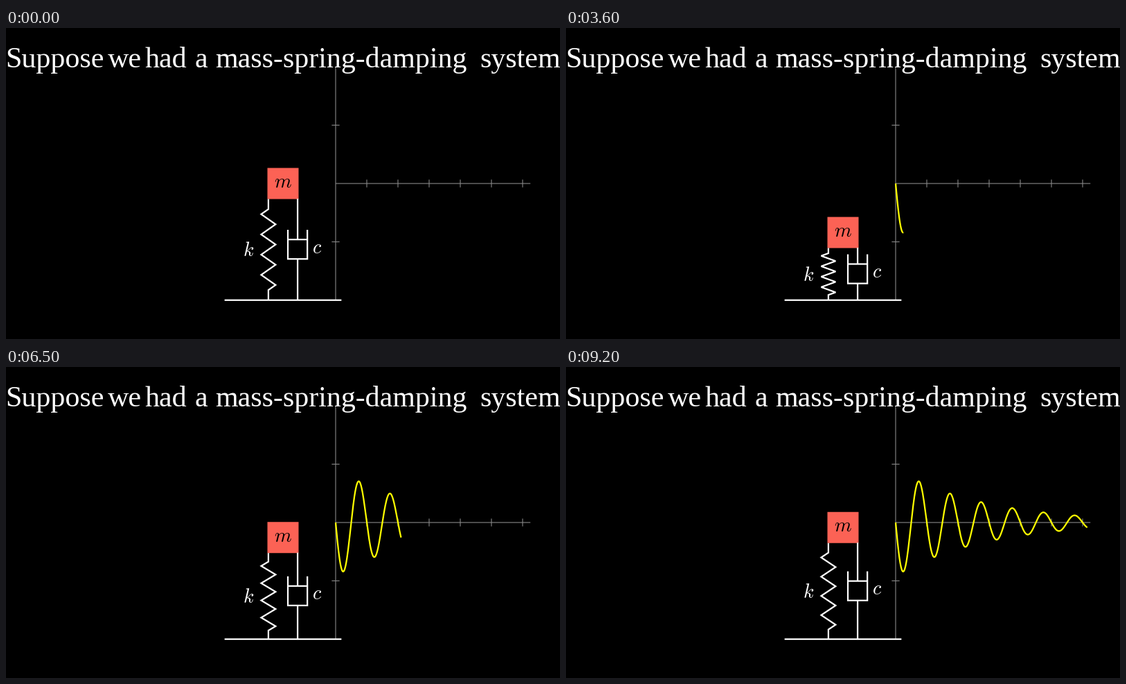
Recreate the animation shown at these times as a matplotlib script. Size 800 by 450 pixels, loop 9300 ms.

```python
import numpy as np
import matplotlib.pyplot as plt
from matplotlib.animation import FuncAnimation
from matplotlib.patches import Polygon, Rectangle

W, H, DPI = 800, 450, 100
FRAMES, STEP = 93, 100
PT = 72 / DPI                    # points per pixel
RED, GREY, YELLOW = "#fc6255", "#888888", "#ffff00"

UNIT = 56.25                     # pixels per scene unit
X0, Y0 = 476, 225                # plot origin
TICK = 0.8 * UNIT                # one second on the time axis
GROUND = Y0 + 3 * UNIT
HALF = 0.4 * UNIT                # half the side of the mass
SPRING_X, DAMPER_X = 400 - 0.375 * UNIT, 400 + 0.375 * UNIT
CUP = 0.25 * UNIT                # half the side of the piston box

plt.rcParams["mathtext.fontset"] = "cm"
plt.rcParams["path.snap"] = False

fig = plt.figure(figsize=(W / DPI, H / DPI), dpi=DPI, facecolor="black")
ax = fig.add_axes([0, 0, 1, 1])
ax.set_xlim(0, W)
ax.set_ylim(H, 0)
ax.axis("off")


def line(xs=(), ys=(), color="white", width=2.25, z=3):
    return ax.plot(xs, ys, color=color, lw=width * PT, zorder=z,
                   solid_capstyle="butt", solid_joinstyle="miter")[0]


def label(x, y, text, color="white", ha="center", size=28, **kw):
    return ax.text(x, y, text, color=color, ha=ha, va="baseline",
                   fontsize=size * PT, zorder=5, **kw)


def smooth(u):
    if u <= 0 or u >= 1:
        return float(u >= 1)
    edge = 1 / (1 + np.exp(5))
    return (1 / (1 + np.exp(-10 * (u - 0.5))) - edge) / (1 - 2 * edge)


def drop(t):
    """Downward displacement of the mass in pixels."""
    return 77.4 * np.exp(-0.35 * t) * np.sin(2 * np.pi * t)


def clock(s):
    """Time on the plot: eased push, hold, then free oscillation."""
    return 0.25 * smooth(s - 2.267) + 1.5 * max(s - 5.267, 0)


# Heading
for x, word in ((-1, "Suppose"), (147, "we"), (201, "had"), (273, "a"),
                (302, "mass-spring-damping"), (684, "system")):
    label(x, 57, word, ha="left", size=42, family="Liberation Serif")

# Axes
axis = dict(color=GREY, width=1.125, z=1)
line([X0, X0 + 5 * UNIT], [Y0, Y0], **axis)
line([X0, X0], [Y0 - 3 * UNIT, GROUND], **axis)
for i in range(1, 7):
    line([X0 + i * TICK] * 2, [Y0 - 0.1 * UNIT, Y0 + 0.1 * UNIT], **axis)
for side in (-1, 1):
    line([X0 - 0.1 * UNIT, X0 + 0.1 * UNIT], [Y0 + side * 1.5 * UNIT] * 2, **axis)

# Mechanism
line([400 - 1.5 * UNIT, 400 + 1.5 * UNIT], [GROUND, GROUND])
mass = ax.add_patch(Rectangle((400 - HALF, Y0 - HALF), 2 * HALF, 2 * HALF,
                              fc=RED, lw=0, zorder=2))
spring, rod_top, rod_low, cup, piston = (line() for _ in range(5))
m_text = label(400, 0, "$m$", "black")
k_text = label(350.5, 0, "$k$")
c_text = label(449.3, 0, "$c$")
curve = line(color=YELLOW, z=4)

# Force
force = [
    line([400, 400], [105.5, 171], RED, 3.6),
    ax.add_patch(Polygon([(390, 170), (410, 170), (400, 189.6)],
                         fc=RED, lw=0, zorder=3)),
    label(424, 155.5, "$F_{ext}$", RED, ha="left"),
]


def draw(i):
    s = i * STEP / 1000
    t = clock(s)
    d = drop(t)
    top = Y0 + HALF + d
    length = GROUND - top
    mid = top + length / 2

    mass.set_y(Y0 - HALF + d)
    m_text.set_y(231 + d)
    k_text.set_y(mid + 9.8)
    c_text.set_y(mid + 5)

    # straight ends take a tenth each, eight zigzag corners between
    zig = 0.1 + 0.1 * (np.arange(8) + 0.5)
    frac = np.concatenate(([0, 0.1], zig, [0.9, 1]))
    side = np.concatenate(([0, 0], np.tile([-1, 1], 4), [0, 0]))
    spring.set_data(SPRING_X + 10.4 * side, top + length * frac)

    a, b = DAMPER_X - CUP, DAMPER_X + CUP
    upper, lower = mid - CUP - 0.5, mid + CUP - 0.5
    rod_top.set_data([DAMPER_X] * 2, [top - 0.5, upper])
    rod_low.set_data([DAMPER_X] * 2, [lower, GROUND])
    cup.set_data([a, a, b, b], [upper - CUP, lower, lower, upper - CUP])
    piston.set_data([a, b], [upper, upper])

    ts = np.linspace(0, t, int(t * 80) + 12)
    curve.set_data(X0 + TICK * ts, Y0 + drop(ts))
    curve.set_visible(t > 0)

    alpha = min(max(smooth(s - 0.267) - smooth(s - 2.267), 0), 1)
    for part in force:
        part.set_alpha(alpha)
    return []


anim = FuncAnimation(fig, draw, frames=FRAMES, interval=STEP,
                     repeat=True, repeat_delay=0, blit=False)
plt.show()
```
